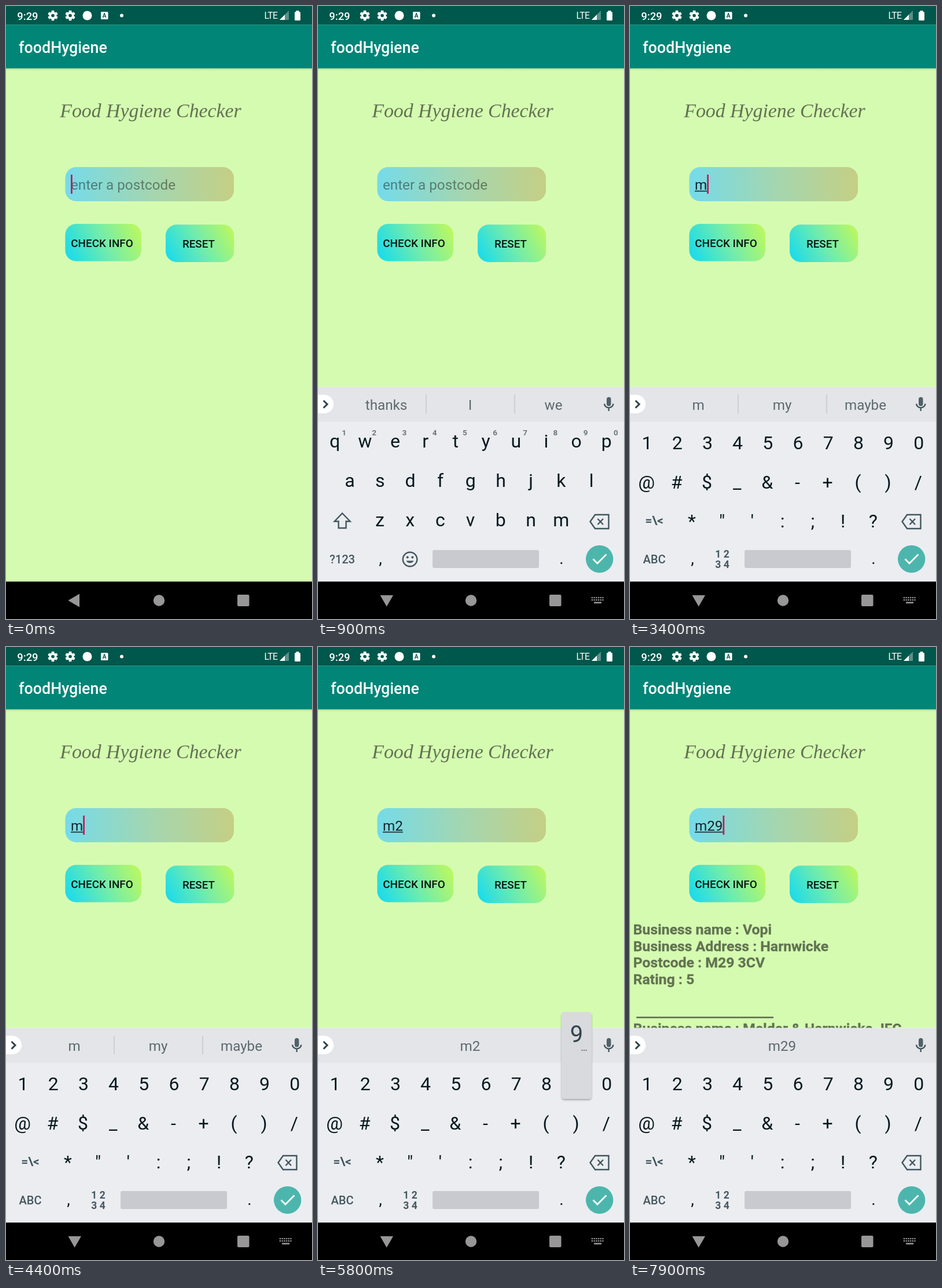
Write an HTML page that moves like this. It is 529 px wide and 1058 px high and loops after 8 s.

```html
<!DOCTYPE html>
<html lang="en">
<head>
<meta charset="utf-8">
<title>Food Hygiene Checker</title>
<style>
html, body { margin: 0; width: 100%; height: 100%; overflow: hidden; background: #d5fbb1; }
svg { display: block; width: 100vw; height: 100vh; font-family: Roboto, "Noto Sans", sans-serif; }
text { white-space: pre; }
.mid { text-anchor: middle; }
.med { font-weight: 500; }
.title { font: italic 33.8px "Dancing Script", "Liberation Serif", serif; fill: #627351; }
.result { font-size: 24.8px; font-weight: 700; fill: #627351; stroke: #627351; stroke-width: .3; }
.key { font-size: 32px; fill: #08191e; text-anchor: middle; }
.sup { font-size: 13.5px; font-weight: 700; fill: #6b767b; text-anchor: middle; }
.sug { font-size: 24.2px; fill: #5d696e; text-anchor: middle; }
.line { fill: none; stroke: #42565d; stroke-width: 2.4; }
.thick { stroke-width: 3; stroke: #33464d; }
</style>
</head>
<body>
<svg id="stage" viewBox="0 0 529 1058" preserveAspectRatio="none"></svg>
<script>
const LOOP = 8000, SLIDE_AT = 200, SLIDE_MS = 450, SLIDE_PX = 335;
const SYMBOLS_AT = 3100, RESULT_AT = 7500;
const PITCH = 52.2, EM = 24.2, FIELD_X = 112, KEYS_TOP = 657.6, NAV_TOP = 993.4;

// Moments that restart the caret blink, with the field content from then on.
const typed = [
  { at: 200, text: "", width: 0, words: ["thanks", "I", "we"] },
  { at: 2200, text: "m", width: .876, words: ["m", "my", "maybe"] },
  { at: 5100, text: "m2", width: 1.438, words: ["", "m2", ""] },
  { at: 5900, text: "m29", width: 2, words: ["", "m29", ""] }
];
const presses = [
  { from: 2000, to: 2200, label: "m", x: 421, y: 766, more: "" },
  { from: 5000, to: 5300, label: "2", x: 81, y: 630, more: "…" },
  { from: 5800, to: 6000, label: "9", x: 447, y: 630, more: "…" }
];

const esc = s => s.replace(/&/g, "&amp;").replace(/</g, "&lt;");
const text = (x, y, s, cls, extra = "") => `<text x="${x}" y="${y}" class="${cls}" ${extra}>${esc(s)}</text>`;
const rect = (x, y, w, h, fill, r = 0, extra = "") =>
  `<rect x="${x}" y="${y}" width="${w}" height="${h}" rx="${r}" fill="${fill}" ${extra}/>`;
const row = (chars, x, y, cls = "key") =>
  [...chars].map((c, i) => text((x + i * PITCH).toFixed(1), y, c, cls)).join("");
const gradient = (id, x1, y1, x2, y2, stops) =>
  `<linearGradient id="${id}" gradientUnits="userSpaceOnUse" x1="${x1}" y1="${y1}" x2="${x2}" y2="${y2}">` +
  stops.map((c, i) => `<stop offset="${i / (stops.length - 1)}" stop-color="${c}"/>`).join("") + "</linearGradient>";

function gear(cx) {
  let teeth = "";
  for (let a = 0; a < 180; a += 60) teeth += rect(cx - 2.4, 7.8, 4.8, 17.4, "#fff", 1, `transform="rotate(${a} ${cx} 16.5)"`);
  return teeth + `<circle cx="${cx}" cy="16.5" r="4.6" fill="none" stroke="#fff" stroke-width="3.6"/>` +
    `<circle cx="${cx}" cy="16.5" r="2.8" fill="#00574b"/>`;
}

const defs = `<defs>
${gradient("field", 102, 315, 394, 300, ["#74dbea", "#a3d6b1", "#c5cf84"])}
${gradient("check", 102, 440, 234, 376, ["#12d9f2", "#70ecac", "#c3f95a"])}
${gradient("reset", 276, 442, 394, 377, ["#12d9f2", "#70ecac", "#c3f95a"])}
${gradient("shade", 0, 107.8, 0, 112, ["#bde09d", "#d5fbb1"])}
<filter id="drop" x="-20%" y="-10%" width="140%" height="125%"><feDropShadow dx="0" dy="2" stdDeviation="1.8" flood-opacity=".3"/></filter>
</defs>`;

const header =
  rect(0, 0, 529, 32.3, "#00574b") + rect(0, 32.3, 529, 75.5, "#008577") + rect(0, 107.8, 529, 4.2, "url(#shade)") +
  text(19.3, 23.5, "9:29", "med", 'font-size="18.4" fill="#fff"') + gear(81) + gear(111) +
  '<circle cx="140.5" cy="16.5" r="8" fill="#fff"/>' +
  rect(164, 10, 12.5, 13, "#fff", 1.5) + text(170.2, 20.3, "A", "mid", 'font-size="10" font-weight="700" fill="#00574b"') +
  '<circle cx="200" cy="16.5" r="3" fill="#fff"/>' +
  text(446.5, 22, "LTE", "", 'font-size="15.8" letter-spacing="-.7" fill="#fff"') +
  '<path d="M489 8V24H473Z" fill="#fff" fill-opacity=".35"/><path d="M482 15V24H473Z" fill="#fff"/>' +
  rect(499, 10, 10, 15, "#fff", 1.5) + rect(501.5, 8, 5, 3, "#fff") +
  text(22, 81, "foodHygiene", "med", 'font-size="26.8" fill="#fff"');

const form =
  text(250, 192, "Food Hygiene Checker", "title mid") +
  rect(102.4, 278, 291.6, 59, "url(#field)", 19) +
  text(FIELD_X, 317, "enter a postcode", "", `id="hint" font-size="${EM}" fill="#000" fill-opacity=".42"`) +
  text(FIELD_X, 317, "", "", `id="entry" font-size="${EM}" fill="#13242a"`) +
  rect(FIELD_X, 318.7, 0, 1.6, "#13242a", 0, 'id="under"') +
  rect(FIELD_X, 291, 2.8, 33, "#c7185f", 0, 'id="caret"') +
  rect(102.4, 376, 131.6, 64.5, "url(#check)", 19) + rect(276, 377.3, 118.3, 64.6, "url(#reset)", 19) +
  text(166, 415.6, "CHECK INFO", "mid med", 'font-size="18.86" fill="#071510"') +
  text(333, 417, "RESET", "mid med", 'font-size="18.86" fill="#071510"');

const lines = ["Business name : Vopi", "Business Address : Harnwicke", "Postcode : M29 3CV", "Rating : 5", "", "",
  "Business name : Melder & Harnwicke JFC"];
const results = '<g id="results">' +
  lines.map((s, i) => text(5.5, (496.4 + 28.4 * i).toFixed(1), s, "result")).join("") +
  rect(11, 638, 237, 2.7, "#627351") + "</g>";

const strip = rect(0, KEYS_TOP, 529, 60, "#e3e5e9") +
  '<path d="M0 671H11A16 16 0 0 1 11 703H0Z" fill="#fff"/><path class="line thick" d="M9.5 681L16 687.3L9.5 693.6"/>' +
  [118, 263, 407].map(x => text(x, 697, "", "sug")).join("") +
  '<path id="rules" d="M187 671V703M340 671V703" stroke="#c5c8cc" stroke-width="1.5"/>' +
  rect(499, 675, 7.5, 15.5, "#506168", 3.7) +
  '<path class="line" d="M495 686.5A7.8 7.8 0 0 0 510.5 686.5M502.7 694V699"/>';

const backspace = '<path class="line" d="M470.5 890L479 878H502.5V902H479ZM483.5 885L493 895M493 885L483.5 895"/>';
const small = (x, y, s, size = 20, weight = 500) =>
  text(x, y, s, "mid", `font-size="${size}" font-weight="${weight}" fill="#45585f"`);
const smiley = '<circle class="line" cx="159" cy="955" r="12.3"/><circle cx="154.7" cy="951.5" r="2" fill="#42565d"/>' +
  '<circle cx="163.3" cy="951.5" r="2" fill="#42565d"/><path d="M152.5 957.5H165.5A7 6 0 0 1 152.5 957.5Z" fill="#42565d"/>';

const keyboard = `<g id="keyboard">
<g id="upper">${rect(0, 717, 529, 341, "#ebedf1")}${strip}
<g class="abc">${row("qwertyuiop", 29, 762)}${row("1234567890", 45, 740.5, "sup")}${row("asdfghjkl", 55, 830)}</g>
<g class="sym">${row("1234567890", 29.5, 765)}${row("@#$_&-+()/", 28.5, 832.5)}</g></g>
<g id="lower">
<g class="abc">${row("zxcvbnm", 107, 898)}<path class="line" d="M42 875.5L55.5 889.5H48.5V901H35.5V889.5H28.5Z"/>${small(42, 962, "?123")}${smiley}</g>
<g class="sym">${row("*\"':;!?", 107, 900)}${small(42, 895, "=\\<", 21, 700)}${small(42, 962, "ABC")}${small(159.5, 952, "1 2", 17.5, 700)}${small(159.5, 970, "3 4", 17.5, 700)}</g>
${backspace}${text(108, 963, ",", "mid", 'font-size="28" fill="#08191e"')}${text(421, 963, ".", "mid", 'font-size="28" fill="#08191e"')}
${rect(198, 939, 184, 31, "#c8cacf", 3)}
<circle cx="486.7" cy="954.5" r="23.7" fill="#4db6ac"/><path d="M475.5 954.5L483 962L498.500 946.5" fill="none" stroke="#fff" stroke-width="2.8"/>
</g>
<g id="popup"><rect x="-26" width="52" height="150" rx="5" fill="#d9dade" filter="url(#drop)"/>
<text class="mid" y="51.5" font-size="40" fill="#31444b"></text><text class="mid" x="13" y="67" font-size="17" fill="#31444b"></text></g>
</g>`;

let dots = "";
for (let i = 0; i < 12; i++) dots += `<rect x="${472.8 + (i % 6) * 3.7}" y="${1020 + Math.floor(i / 6) * 4}" width="2.3" height="2.3"/>`;
const nav = rect(0, NAV_TOP, 529, 65, "#000", 0, 'id="navBg"') + '<g id="icons"><path id="back"/>' +
  '<circle cx="264.5" cy="1026" r="9.7"/><rect x="400" y="1016" width="20.5" height="20" rx="2"/>' +
  `<g id="kbIcon">${dots}<rect x="477" y="1028.5" width="13" height="2.6"/></g></g>`;

document.getElementById("stage").innerHTML = defs + rect(0, 0, 529, 1058, "#d5fbb1") + header + form + results +
  rect(0, KEYS_TOP, 529, 401, "#fafafa", 0, 'id="gap"') + keyboard + nav;

const $ = id => document.getElementById(id);
const set = (el, attrs) => { for (const k in attrs) el.setAttribute(k, attrs[k]); };
const show = (el, on) => el.setAttribute("visibility", on ? "visible" : "hidden");
const sugs = document.querySelectorAll(".sug");
const [popMain, popMore] = $("popup").querySelectorAll("text");

function draw(t) {
  const open = t >= SLIDE_AT;
  const p = Math.min(1, Math.max(0, (t - SLIDE_AT) / SLIDE_MS));
  const eased = 1 - (1 - p) ** 2;
  const sliding = open && p < 1;

  show($("gap"), open);
  $("keyboard").style.display = open ? "" : "none";
  set($("keyboard"), { transform: `translate(0 ${SLIDE_PX * (1 - eased)})` });
  set($("upper"), { opacity: p < 1 ? eased * .8 : 1 });
  set($("lower"), { opacity: Math.min(1, eased * 1.3) });
  set($("navBg"), { "fill-opacity": sliding ? .5 : 1 });
  set($("icons"), { fill: sliding ? "#c4c5c7" : "#979797" });
  set($("back"), { d: open ? "M107.5 1017H130L118.7 1036.5Z" : "M127 1014.5V1037.5L107.5 1026Z" });
  show($("kbIcon"), open);

  const symbols = t >= SYMBOLS_AT;
  document.querySelectorAll(".abc").forEach(g => show(g, !symbols));
  document.querySelectorAll(".sym").forEach(g => show(g, symbols));

  const now = typed.filter(s => s.at <= t).pop() || typed[0];
  const width = now.width * EM;
  show($("hint"), !now.text);
  $("entry").textContent = now.text;
  set($("under"), { width });
  set($("caret"), { x: FIELD_X + width });
  show($("caret"), t < now.at || (t - now.at) % 1000 < 500);
  sugs.forEach((el, i) => { el.textContent = now.words[i]; });
  show($("rules"), now.words[0]);

  const press = presses.find(k => t >= k.from && t < k.to);
  show($("popup"), press);
  if (press) {
    set($("popup"), { transform: `translate(${press.x} ${press.y})` });
    popMain.textContent = press.label;
    popMore.textContent = press.more;
  }
  show($("results"), t >= RESULT_AT);
}

const start = performance.now();
function tick() {
  draw((performance.now() - start) % LOOP);
  requestAnimationFrame(tick);
}
draw(0);
requestAnimationFrame(tick);
</script>
</body>
</html>
```
